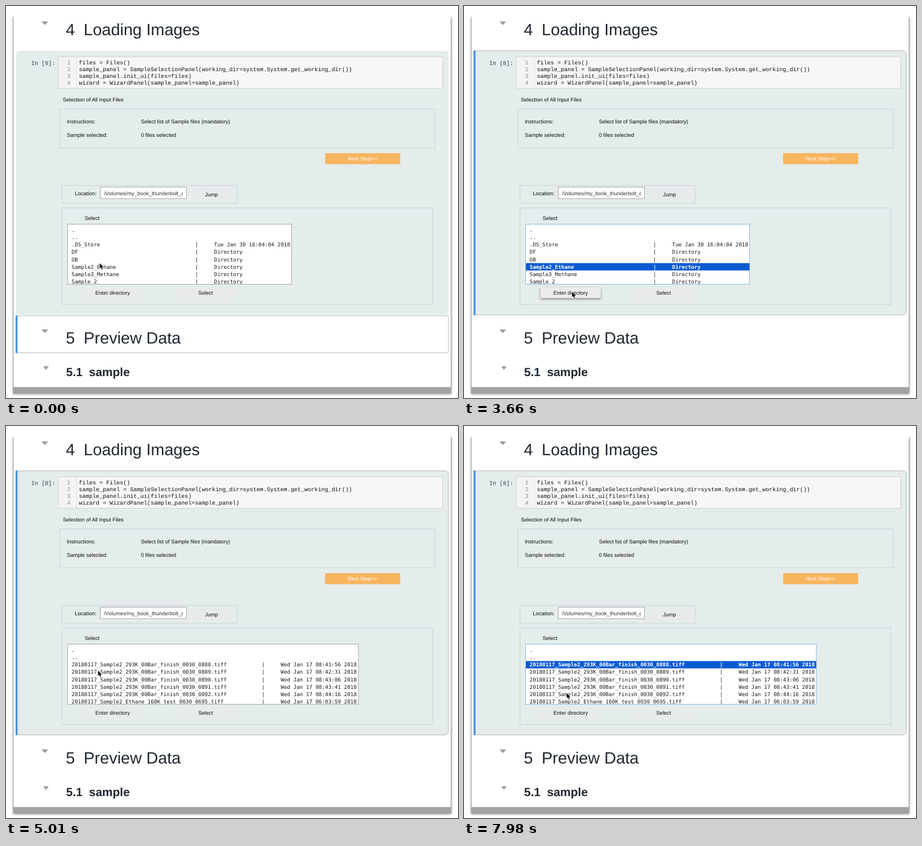
Write an HTML page with a canvas that moves like this. It is 803 px wide and 698 px high and loops after 8 s.

```html
<!DOCTYPE html>
<html lang="en">
<head>
<meta charset="utf-8">
<title>Loading Images</title>
<style>
html, body { margin: 0; width: 100%; height: 100%; overflow: hidden; background: #fff; }
canvas { display: block; }
</style>
</head>
<body>
<canvas id="stage" width="803" height="698"></canvas>
<script>
const ctx = document.getElementById('stage').getContext('2d');
const LOOP = 8000;
const SANS = '"Liberation Sans", Arial, sans-serif';
const CODE = '10.12px "Liberation Mono", monospace';
const LIST = '9.35px "DejaVu Sans Mono", monospace';
const UI = '9.45px ' + SANS;
const INK = '#1f2731', CELL = '#e4ecec', LINE = '#cdd2d4', BLUE = '#4794de';
const CHAR = 5.63;

// Times of the hard changes
const PICK_DIR = 2190, ENTER = 3870, LOADED = 4620, PICK_FILE = 6330;

// Pointer stops: time, x, y
const STOPS = [
  [0, 166.5, 458], [1262, 166.5, 458], [1290, 177, 461], [1320, 177, 461],
  [1350, 180.5, 465], [2500, 180.5, 465], [3200, 192, 509], [4640, 192, 509],
  [4980, 163.5, 435.5], [5280, 163.5, 435.5], [6050, 171, 423], [6090, 172, 421],
  [6800, 172, 421], [7500, 186, 483], [7810, 186, 483], [7970, 182.5, 475.5], [8000, 182.5, 475.5]
];

const DIRS = [
  ['.'], ['..'], ['.DS_Store', 'Tue Jan 30 16:04:04 2018'],
  ...['DF', 'OB', 'Sample2_Ethane', 'Sample3_Methane', 'Sample_2'].map(n => [n, 'Directory'])
];
const TIMES = ['08:41:56', '08:42:31', '08:43:06', '08:43:41', '08:44:16', '06:03:59'];
const FILES = [['.'], ['..'], ...TIMES.map((time, i) => [
  '20180117_Sample2_' + (i < 5 ? '293K_00Bar_finish_0030_0' + (888 + i) : 'Ethane_160K_test_0030_0695') + '.tiff',
  `Wed Jan 17 ${time} 2018`
])];

function text(str, x, y, font = UI, color = '#0c0c0c', align = 'left') {
  ctx.font = font;
  ctx.fillStyle = color;
  ctx.textAlign = align;
  ctx.fillText(str, x, y);
}

function fill(x, y, w, h, color) {
  ctx.fillStyle = color;
  ctx.fillRect(x, y, w, h);
}

function box(x, y, right, bottom, color, bg) {
  if (bg) fill(x, y, right - x, bottom - y, bg);
  ctx.strokeStyle = color;
  ctx.lineWidth = 1;
  ctx.strokeRect(x, y, right - x, bottom - y);
}

function clipped(x, y, w, h, draw) {
  ctx.save();
  ctx.beginPath();
  ctx.rect(x, y, w, h);
  ctx.clip();
  draw();
  ctx.restore();
}

function triangle(x, y, r) {
  ctx.fillStyle = '#9c9c9c';
  ctx.beginPath();
  ctx.moveTo(x - r, y - 3);
  ctx.lineTo(x + r, y - 3);
  ctx.lineTo(x, y + 3.5);
  ctx.fill();
}

function heading(num, title, y) {
  const font = '29px ' + SANS;
  triangle(69, y - 11.3, 6);
  text(num, 106.3, y + 10.5, font, INK);
  text(title, 138, y + 10.5, font, INK);
}

function subheading(num, title, y) {
  const font = 'bold 21px ' + SANS;
  triangle(71, y - 6.5, 5);
  text(num, 106.7, y + 7.5, font, INK);
  text(title, 147.5, y + 7.5, font, INK);
}

function cell(top, bottom, bg, active) {
  ctx.beginPath();
  ctx.roundRect(17.5, top, 768.5, bottom - top, bg ? (active ? [0, 6, 6, 0] : 6) : 1);
  if (bg) {
    ctx.fillStyle = bg;
    ctx.fill();
  }
  if (!active) return;
  ctx.strokeStyle = '#b1b4b6';
  ctx.lineWidth = 1;
  ctx.stroke();
  fill(17, top - 0.5, 3.4, bottom - top + 1, BLUE);
}

function code(prompt, top, bottom, lines) {
  text(`In [${prompt}]:`, 45, top + 14.3, CODE, '#333c4f');
  box(92.5, top, 775.5, bottom, '#d0d2d3', '#f7f7f7');
  fill(93, top + 0.5, 32, bottom - top - 1, '#f3f3f3');
  fill(125, top + 0.5, 1, bottom - top - 1, '#dedede');
  lines.forEach((line, i) => {
    const y = top + 13.8 + i * 11.9;
    text(i + 1, 114.5, y, CODE, '#8b8b8b', 'right');
    let x = 129.5;
    line.split(/('.*')/).forEach(part => {
      text(part, x, y, CODE, part[0] === "'" ? '#87402f' : '#111');
      x += ctx.measureText(part).width;
    });
  });
}

function button(label, x, y, w, raised) {
  ctx.save();
  if (raised) {
    ctx.shadowColor = 'rgba(0,0,0,.42)';
    ctx.shadowBlur = 4;
    ctx.shadowOffsetY = 1.5;
  }
  fill(x, y, w, 19, raised ? '#ececed' : '#e8eaec');
  ctx.restore();
  text(label, x + w / 2, y + 13, UI, '#111', 'center');
}

function fileList(rows, picked, right, barCol) {
  const left = 116.5;
  fill(109, 389, right - 109, 107, '#fff');
  clipped(109, 389, right - 109, 106, () => rows.forEach(([name, info], i) => {
    const mid = 398.9 + i * 13.1, on = i === picked;
    const font = (on ? 'bold ' : '') + LIST, color = on ? '#fff' : '#1b1b1b';
    if (on) fill(109, mid - 6.6, right - 109, 13.1, '#0c5bd3');
    text(name, left, mid + 3.2, font, color);
    if (!info) return;
    text('|', left + barCol * CHAR, mid + 3.2, font, color);
    text(info, left + (barCol + 6) * CHAR, mid + 3.2, font, color);
  }));
  box(109.5, 388.5, right, 495.5, picked >= 0 ? '#86b9e2' : '#a3a6a8');
}

function browser(t, x, y) {
  box(99.5, 319.5, 410.5, 351, LINE);
  text('Location:', 122.3, 336.5);
  box(167.5, 322.5, 320.5, 343, '#9fa3a5', '#fff');
  clipped(170, 323, 144.5, 20, () => text('/Volumes/my_book_thunderbolt_data', 174, 336.5, UI, '#333'));
  button('Jump', 326, 325.5, 78);

  box(99.5, 359.5, 758.5, 531.5, LINE);
  text('Select', 139.8, 381.2);
  if (t < LOADED) fileList(DIRS, t >= PICK_DIR ? 5 : -1, 507.5, 39);
  else fileList(FILES, t >= PICK_FILE ? 2 : -1, 626, 60);
  button('Enter directory', 136, 501, 107, x > 136 && x < 243 && y > 501 && y < 520);
  button('Select', 301, 501, 107);
}

function loader(t, x, y, waiting) {
  cell(79.8, waiting ? 325 : 550, CELL, t >= PICK_DIR);
  code('8', 90.5, 146.5, [
    'files = Files()',
    'sample_panel = SampleSelectionPanel(working_dir=system.System.get_working_dir())',
    'sample_panel.init_ui(files=files)',
    'wizard = WizardPanel(sample_panel=sample_panel)'
  ]);
  text('Selection of All Input Files', 101, 169.5);
  box(95.5, 183.5, 762.5, 252.5, LINE);
  text('Instructions:', 108, 209.4);
  text('Select list of Sample files (mandatory)', 239.7, 209.4);
  text('Sample selected:', 108, 232.6);
  text('0 files selected', 239.7, 232.6);
  fill(567, 262, 133.3, 19.6, '#f8b55f');
  text('Next Step>>', 633.2, 275.3, UI, '#fff', 'center');
  if (waiting) text('Please wait...', 95.5, 304.2);
  else browser(t, x, y);
}

function below(t, waiting) {
  if (!waiting) {
    if (t < PICK_DIR) cell(551.5, 617.5, null, true);
    heading('5', 'Preview Data', 590.3);
    subheading('5.1', 'sample', 651);
    return;
  }
  heading('5', 'Preview Data', 365.3);
  subheading('5.1', 'sample', 425.7);
  cell(459, 513, CELL);
  code(' ', 469.5, 502.5, ['o_norm = sample_panel.o_norm', "o_norm.plot_images(data_type='sample')"]);
  subheading('5.2', 'ob', 546.7);
  cell(580, 622, CELL);
  code(' ', 590.5, 611.5, ["o_norm.plot_images(data_type='ob')"]);
  heading('6', 'Select Background Region', 661.3);
}

function frame() {
  fill(0, 0, 803, 698, '#fff');
  ctx.save();
  ctx.shadowColor = 'rgba(0,0,0,.5)';
  ctx.shadowBlur = 4;
  ctx.shadowOffsetY = 1;
  fill(12.5, 18, 778.5, 672, '#a3a3a3');
  ctx.restore();
  fill(13.5, 0, 776.5, 678.5, '#fff');
  const fade = ctx.createLinearGradient(0, 14, 0, 24);
  fade.addColorStop(0, '#fff');
  fade.addColorStop(1, 'rgba(255,255,255,0)');
  fill(0, 0, 803, 24, fade);
}

function pointerAt(t) {
  const i = STOPS.findIndex(s => s[0] > t);
  const [t0, x0, y0] = STOPS[i - 1], [t1, x1, y1] = STOPS[i];
  const p = (t - t0) / (t1 - t0), k = p * p * (3 - 2 * p);
  return [x0 + (x1 - x0) * k, y0 + (y1 - y0) * k];
}

function pointer(x, y) {
  const path = new Path2D('M0 0V9.6L2.2 7.6L3.8 11.2L5.4 10.5L3.9 7H6.8Z');
  ctx.save();
  ctx.translate(x, y);
  ctx.lineJoin = 'round';
  ctx.strokeStyle = '#fff';
  ctx.lineWidth = 1.6;
  ctx.stroke(path);
  ctx.fillStyle = '#0a0a0a';
  ctx.fill(path);
  ctx.restore();
}

function draw(t) {
  const [x, y] = pointerAt(t);
  const waiting = t >= ENTER && t < LOADED;
  frame();
  clipped(13, 0, 778, 678.5, () => {
    heading('4', 'Loading Images', 41.7);
    loader(t, x, y, waiting);
    below(t, waiting);
  });
  pointer(x, y);
}

ctx.textRendering = 'geometricPrecision';
const start = performance.now();
function tick() {
  draw((performance.now() - start) % LOOP);
  requestAnimationFrame(tick);
}
tick();
</script>
</body>
</html>
```
